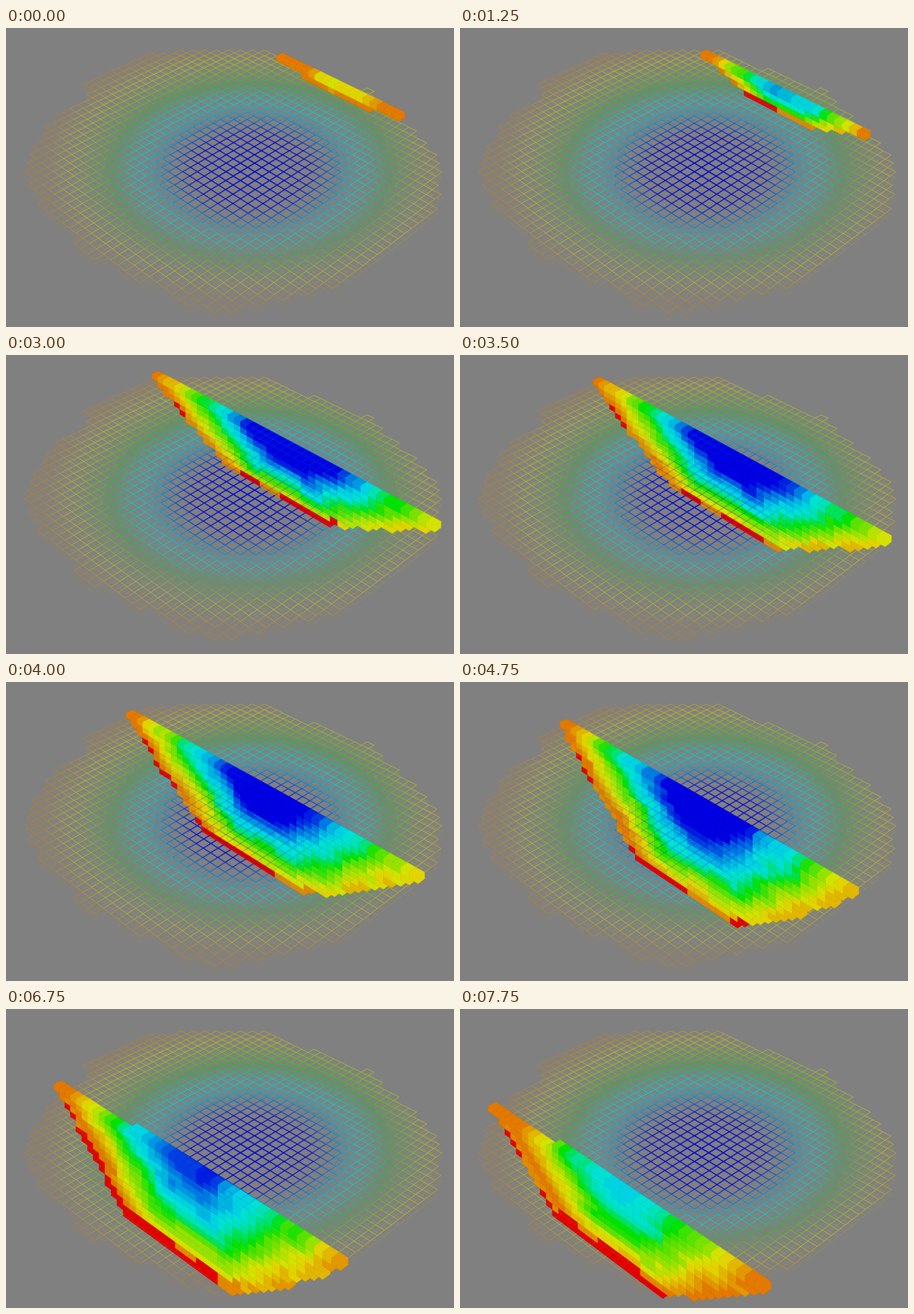
These frames come from a looping animation (568 by 380 pixels, 8 s). A matplotlib script:

```python
import colorsys
import math

import matplotlib.pyplot as plt
import numpy as np
from matplotlib.animation import FuncAnimation
from matplotlib.collections import LineCollection, PolyCollection
from matplotlib.path import Path

W, H, DPI = 568, 380, 100
STEP, FRAMES = 250, 32
PX = 72 / DPI
HORIZON = -700
PAUSED = {23, 25, 26, 28}   # ticks on which the section does not advance

RIM = Path([(180, 33), (318, 28), (460, 80), (547, 165), (543, 226),
            (434, 323), (295, 357), (250, 357), (102, 282), (33, 205),
            (25, 175), (63, 114), (104, 94), (104, 71)])


def project(i, r, z=0.0):
    """Grid column, row and depth level to stage pixels."""
    u = 1.45199 - 0.0071 * i - 0.007077 * r
    x = 284 + (10.24 * i - 10.43 * r - 32.4) / u
    return x, HORIZON + 1000 / u * (1 + z * 7.8 / 900)


def ramp(k):
    """Blue at the core through cyan, green and yellow to orange."""
    return np.interp(k, [.28, .45, .58, .7, .85, 1],
                     [239, 192, 170, 105, 62, 36])


def paint(hue, alpha=1.0, value=0.89):
    return (*colorsys.hsv_to_rgb(hue / 360, 1, value), alpha)


# ---- translucent wire grid ----
def wire_edges():
    edges = set()
    for r in range(-8, 46):
        for i in range(-10, 54):
            if RIM.contains_point(project(i + 0.5, r + 0.5)):
                edges |= {(i, r, 1, 0), (i, r + 1, 1, 0),
                          (i, r, 0, 1), (i + 1, r, 0, 1)}
    return sorted(edges)


def add_wire(fade, layer):
    segs, cols, widths = [], [], []
    for z, weight in ((0, 1.0), (0.95, 0.35)):
        for i, r, di, dr in wire_edges():
            p, q = project(i, r, z), project(i + di, r + dr, z)
            rho = math.hypot((p[0] + q[0] - 620) / 530,
                             (p[1] + q[1] - 364) / 334)
            if z and rho < 0.4:
                continue
            alpha = max(0.42, 0.9 - 0.5 * rho) * weight * fade
            segs.append((p, q))
            cols.append(paint(ramp(rho), alpha, 0.85))
            widths.append(max(0.85, 1.5 - rho) * PX)
    ax.add_collection(LineCollection(segs, colors=cols, linewidths=widths,
                                     zorder=layer), autolim=False)


# ---- solid section ----
def jitter(*cell):
    s = math.sin(np.dot(cell, (12.99, 78.23, 37.72))) * 43758.55
    return 2 * (s - math.floor(s)) - 1


def span(r):
    first = 12 * max(0, 1 - r / 10) ** 1.5 + 0.35 * max(0, r - 20)
    end = 42 - 12 * max(0, 1 - r / 11) ** 1.7
    return round(first), round(end)


def cell_hue(i, p, z, deep, last, r):
    t = z / deep
    k = max(t, (abs(p - 0.54) + 0.32 * t) / 0.5)
    away = max(0, 0.85 - 0.21 * r, 0.047 * (r - 17))
    k = math.hypot(k, away) + 0.04 * jitter(i // 3, z // 2, r // 3)
    hue = 8 * round(ramp(k) / 8)
    layers = 2 if r > 22 else 1
    if last > 2 and last - z < layers and p < 0.7:
        hue = 0 if jitter(i // 3, z - last, r) < 0.25 else 36
    return hue


def block(i, r, z):
    return [project(i, r, z), project(i + 1, r, z), project(i + 1, r, z + 1),
            project(i + 1, r + 1, z + 1), project(i, r + 1, z + 1),
            project(i, r + 1, z)]


def section(r):
    first, end = span(r)
    deep = np.interp(r, [0, 18, 23, 28], [2, 18.5, 17.5, 12.5])
    polys, hues = [], []
    for i in range(first, end):
        p = (i + 0.5 - first) / (end - first)
        wall = min(1, p / 0.32, (1 - p) / 0.34) ** 0.85
        top = int(r >= 20 and i < 14)
        last = max(top, round(deep * wall) - 1)
        for z in range(last, top - 1, -1):
            polys.append(block(i, r, z))
            hues.append(cell_hue(i, p, z, deep, last, r))
    return polys, hues


def row_at(frame):
    while frame in PAUSED:
        frame -= 1
    return max(0, frame - 3)


fig = plt.figure(figsize=(W / DPI, H / DPI), dpi=DPI, facecolor="#808080")
ax = fig.add_axes([0, 0, 1, 1])
ax.set_xlim(0, W)
ax.set_ylim(H, 0)
ax.axis("off")

add_wire(1.0, 1)
solid = PolyCollection([], linewidths=0.5 * PX, zorder=2)
ax.add_collection(solid, autolim=False)
add_wire(0.25, 3)


def draw(frame):
    polys, hues = section(row_at(frame))
    solid.set_verts(polys)
    solid.set_facecolor([paint(h) for h in hues])
    solid.set_edgecolor([paint(h, value=0.83) for h in hues])
    return (solid,)


anim = FuncAnimation(fig, draw, frames=FRAMES, init_func=lambda: draw(0),
                     interval=STEP, repeat=True, repeat_delay=0)
plt.show()
```
